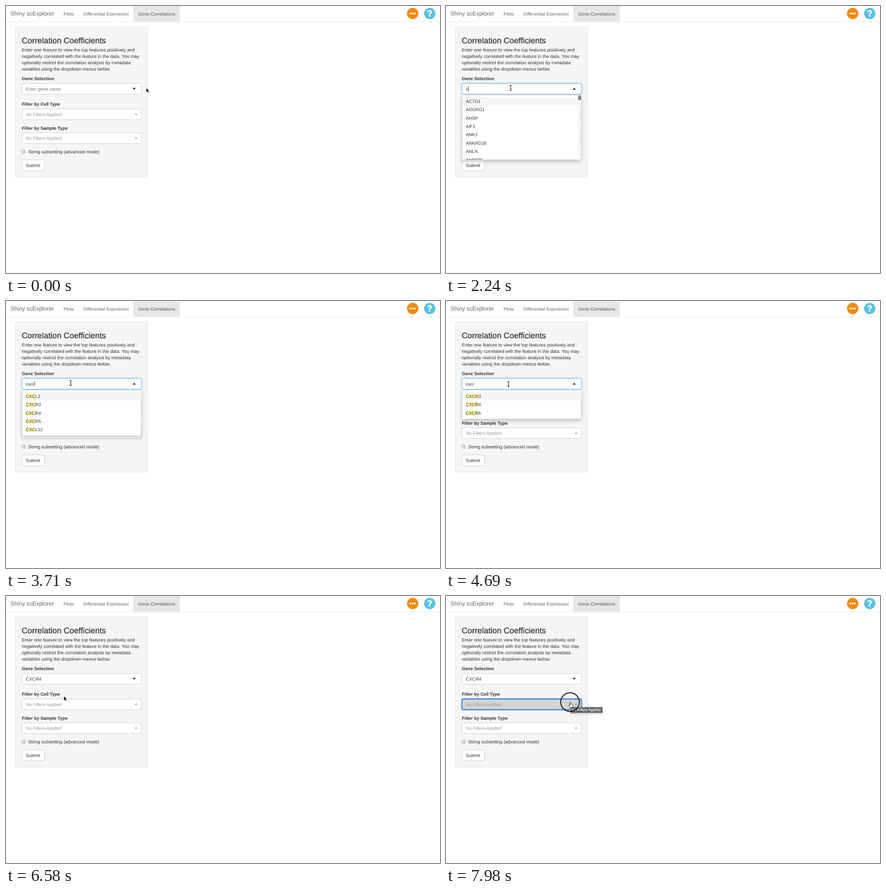
Animation of 953x587 px, one loop 8000 ms. Source, as an HTML page:

```html
<!DOCTYPE html>
<html lang="en">
<head>
<meta charset="utf-8">
<title>Gene Correlations</title>
<style>
  html, body { margin: 0; width: 100%; height: 100%; overflow: hidden; background: #fff; }
  svg { display: block; width: 953px; height: 587px; }
  text {
    font: 10px "Liberation Sans", Arial, sans-serif;
    fill: #333; text-rendering: geometricPrecision; white-space: pre;
  }
  .brand { font-size: 12.8px; fill: #777; }
  .nav text { fill: #666; }
  .heading { font-size: 17.85px; stroke: #333; stroke-width: .3px; }
  .label { font-size: 9.8px; font-weight: bold; }
  .body { font-size: 10.05px; }
  .hint { fill: #777; }
  .muted { fill: #999; }
  .box { fill: #fff; stroke: #ccc; }
  .focused { stroke: #66afe9; filter: drop-shadow(0 0 2px rgba(102, 175, 233, .6)); }
  .hover { fill: #e6e6e6; stroke: #adadad; }
  .pressed { fill: #d4d4d4; stroke: #3a82e0; stroke-width: 2.4px; }
  .menu { filter: drop-shadow(0 4px 4px rgba(0, 0, 0, .2)); }
  #items text { font-size: 9.8px; }
  .tip { filter: drop-shadow(0 2px 2px rgba(0, 0, 0, .2)); }
  .tip text { font-size: 8.1px; fill: #fff; stroke: #fff; stroke-width: .15px; }
</style>
</head>
<body>
<svg viewBox="0 0 953 587">
  <g class="nav">
    <path d="M0 35H953" stroke="#e7e7e7"/>
    <rect x="280" width="101.5" height="34.5" fill="#e7e7e7"/>
    <text class="brand" x="9.7" y="21.4">Shiny scExplorer</text>
    <text x="126.5" y="20.6">Plots</text>
    <text x="170" y="20.6">Differential Expression</text>
    <text x="290.3" y="20.6" style="fill:#555">Gene Correlations</text>
    <circle cx="893" cy="16.5" r="12.5" fill="#ee8a0c"/>
    <g fill="#fff">
      <circle cx="888" cy="16.5" r="2"/>
      <circle cx="893" cy="16.5" r="2"/>
      <circle cx="898" cy="16.5" r="2"/>
    </g>
    <circle cx="930.5" cy="16.5" r="12.5" fill="#5bc0de"/>
    <text x="930.5" y="23.3" text-anchor="middle" style="font-size:19.5px;font-weight:bold;fill:#fff;stroke:#fff;stroke-width:.4px">?</text>
  </g>

  <rect x="20.5" y="45.5" width="291" height="330.5" rx="3" fill="#f5f5f5" stroke="#e3e3e3"/>
  <text class="heading" x="34.4" y="82.4">Correlation Coefficients</text>
  <g id="intro"></g>
  <text class="label" x="34.8" y="163.2">Gene Selection</text>
  <text class="label" x="34.8" y="219.2">Filter by Cell Type</text>
  <text class="label" x="34.8" y="271.7">Filter by Sample Type</text>

  <rect id="gene" class="box" x="35" y="170.3" width="262.5" height="23.7" rx="3"/>
  <text id="hint" class="hint" x="43.6" y="185.8">Enter gene name</text>
  <text id="typed" x="43.6" y="185.8"></text>
  <path id="caret" d="M0 176.5V187.5" stroke="#222"/>
  <path id="arrow" d="M-3.7 -1.9H3.7L0 1.9Z" fill="#222"/>

  <rect id="cell" class="box" x="35" y="226.3" width="262.5" height="23.7" rx="3"/>
  <rect class="box" x="35" y="278.8" width="262.5" height="23.7" rx="3"/>
  <text class="muted" x="43.6" y="241.8">No Filters Applied</text>
  <text class="muted" x="43.6" y="294.3">No Filters Applied</text>
  <path d="M282.8 237H288.4L285.6 239.9ZM282.8 289.5H288.4L285.6 292.4Z" fill="#888"/>

  <rect x="35.2" y="316.8" width="7.2" height="7.2" rx="1.2" fill="#e0e0e0" stroke="#aaa"/>
  <text x="48.8" y="324.2" style="font-size:10.05px">String subsetting (advanced mode)</text>
  <rect class="box" x="35" y="338.3" width="49.5" height="23.7" rx="3"/>
  <text x="43.6" y="353.9" style="font-size:10.15px">Submit</text>

  <g id="menu">
    <rect id="sheet" class="menu" x="35.5" y="196" width="261.5" rx="1.5" fill="#fff" stroke="#d0d0d0" stroke-width=".7"/>
    <clipPath id="clip"><rect x="35" y="196" width="262" height="142"/></clipPath>
    <g id="items" clip-path="url(#clip)"></g>
    <g id="bar">
      <rect x="290.3" y="196.4" width="6.5" height="141.5" fill="#f3f3f3"/>
      <rect x="290" y="196.4" width="7" height="10.6" rx="3" fill="#8a8a8a"/>
    </g>
  </g>

  <g id="tip" class="tip">
    <rect x="273.4" y="244.3" width="70.2" height="12.6" fill="#626262" stroke="#999" stroke-width=".7"/>
    <text x="276" y="253.4">No Filters Applied</text>
  </g>
  <circle id="ring" r="20.5" fill="none" stroke="#111" stroke-width="2"/>
  <g id="pointer">
    <path id="point" d="M0 0V10.2L2.4 8L3.9 11.5L5.6 10.8L4.1 7.4H7.2Z" fill="#000" stroke="#fff" stroke-width=".7"/>
    <path id="beam" d="M-2.6 -5.8Q0 -5.8 0 -4Q0 -5.8 2.6 -5.8M0 -4V4M-2.6 5.8Q0 5.8 0 4Q0 5.8 2.6 5.8M-1.3 1.8H1.3" fill="none" stroke="#111" stroke-width="1.1"/>
    <path id="hand" d="M-.9 1Q0 -.6 1 1L1.8 4.6Q3 3.6 3.6 4.8Q4.8 4 5.3 5.2Q6.6 4.8 6.8 6.2L6.6 9L5.8 12H.5L-2.6 8Q-3.2 6.4 -1.6 6.5L.2 7.6Z" fill="#fff" stroke="#111" stroke-width=".9" stroke-linejoin="round"/>
  </g>
</svg>
<script>
const LOOP = 8000, TICK = 70, ROW = 18.4;
const $ = id => document.getElementById(id);

function add(parent, tag, attrs, content = '') {
  const node = document.createElementNS('http://www.w3.org/2000/svg', tag);
  for (const name in attrs) node.setAttribute(name, attrs[name]);
  node.textContent = content;
  return parent.appendChild(node);
}

[
  'Enter one feature to view the top features positively and',
  'negatively correlated with the feature in the data. You may',
  'optionally restrict the correlation analysis by metadata',
  'variables using the dropdown menus below.'
].forEach((line, i) => add($('intro'), 'text', { class: 'body', x: 34.6, y: 99.5 + 14.2 * i }, line));

const genes = {
  '': 'ACTG1 ADGRG1 AHSP AIF1 ANK1 ANKRD28 ANLN ANP32E',
  c: 'CA1 CA2 CD4 CD7 CD9 CFD CFP CKB',
  cx: 'CXCL2 CXCR3 CXCR4 CXCR5 CXCL12',
  cxc: 'CXCL2 CXCR3 CXCR4 CXCR5 CXCL12',
  cxcr: 'CXCR3 CXCR4 CXCR5'
};

// Each entry is [start time, value].
const typing = [[0, ''], [2240, 'c'], [2730, 'cx'], [3220, 'cxc'], [3710, 'cxcr'], [5600, 'CXCR4']];
const queries = [[0, null], [980, ''], [2450, 'c'], [2870, 'cx'], [3360, 'cxc'], [3780, 'cxcr'], [5600, null]];
const carets = [[0, 0], [1050, 1], [1610, 0], [2100, 1], [4200, 0], [4760, 1], [5250, 0]];
const clicks = [910, 5530, 7980];

// Pointer stops: time, x, y.
const path = [
  [0, 308, 180], [770, 141.5, 179.5], [910, 141.5, 179.5], [980, 142, 180],
  [4620, 142, 180], [4690, 137, 183], [5320, 108, 230],
  [6230, 108, 230], [6370, 110, 228], [6440, 110, 228],
  [6580, 127, 220], [7140, 272.3, 233.2], [LOOP, 272.3, 233.2]
];

const at = (steps, t) => steps.filter(step => step[0] <= t).pop()[1];
const ease = p => p * p * (3 - 2 * p);
const show = (id, on) => $(id).setAttribute('display', on ? 'inline' : 'none');
const move = (id, x, y) => $(id).setAttribute('transform', `translate(${x} ${y})`);

function pointerAt(t) {
  const i = path.findIndex(stop => stop[0] > t);
  const [t0, x0, y0] = path[i - 1], [t1, x1, y1] = path[i];
  const p = ease((t - t0) / (t1 - t0));
  return [x0 + (x1 - x0) * p, y0 + (y1 - y0) * p];
}

let drawn = '';
function drawMenu(query, active) {
  show('menu', query !== null);
  const key = query + '/' + active;
  if (query === null || key === drawn) return;
  drawn = key;
  const names = genes[query].split(' ');
  const long = names.length > 7;
  show('bar', long);
  $('sheet').setAttribute('height', long ? 142 : names.length * ROW + 8);
  const items = $('items');
  items.replaceChildren();
  names.forEach((name, i) => {
    const y = 199.7 + ROW * i;
    if (i === active) add(items, 'rect', { x: 36, y, width: long ? 254.5 : 260.7, height: ROW, fill: '#f5f5f5' });
    const mark = query && add(items, 'rect', { x: 43.6, y: y + 4, height: 11, fill: '#fff8a9' });
    const text = add(items, 'text', { x: 43.6, y: y + 13 }, name);
    if (mark) mark.setAttribute('width', text.getSubStringLength(0, query.length));
  });
}

function render(time) {
  const t = Math.floor(time % LOOP / TICK) * TICK;
  const [x, y] = pointerAt(t);
  const typed = at(typing, t), query = at(queries, t);
  const open = query !== null;

  $('typed').textContent = typed;
  show('hint', !typed);
  show('caret', at(carets, t));
  move('caret', 44.4 + (typed ? $('typed').getComputedTextLength() : 0), 0);
  $('gene').setAttribute('class', open ? 'box focused' : 'box');
  $('arrow').setAttribute('transform', `translate(281.5 181.8) scale(1 ${open ? -1 : 1})`);
  drawMenu(query, open && y > 218 ? 1 : 0);

  const pressed = t >= 7980;
  const hover = t >= 5600 && y >= 226;
  $('cell').setAttribute('class', pressed ? 'box pressed' : hover ? 'box hover' : 'box');
  show('tip', pressed);

  const beam = open && y < 195;
  show('beam', beam);
  show('hand', hover);
  show('point', !beam && !hover);
  move('pointer', x, y);
  show('ring', clicks.some(c => t >= c && t < c + 2 * TICK));
  move('ring', x, y);
}

const start = performance.now();
(function frame() {
  render(performance.now() - start);
  requestAnimationFrame(frame);
})();
</script>
</body>
</html>
```
